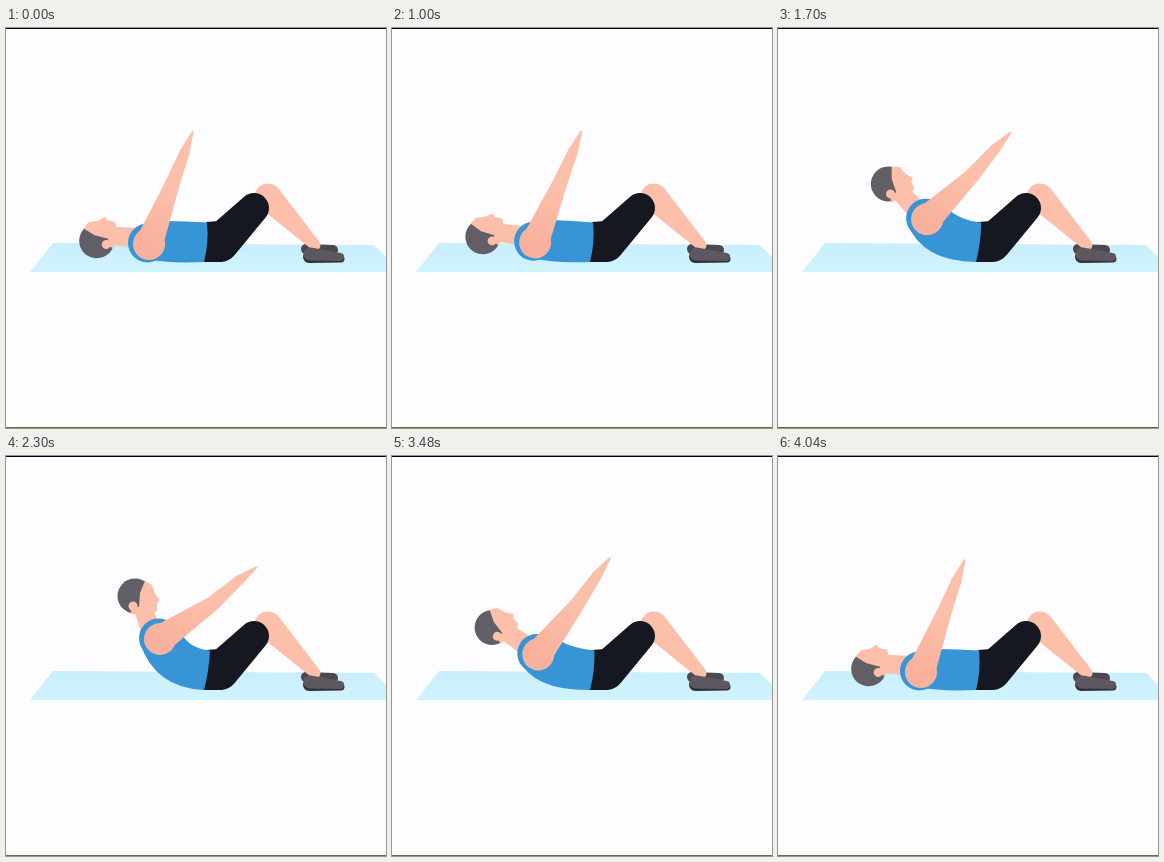
An HTML page with a canvas for the animation above (4140 ms loop, 380x400 px).

```html
<!DOCTYPE html>
<html lang="en">
<head>
<meta charset="utf-8">
<title>Sit-up</title>
<style>
html, body { margin: 0; width: 100%; height: 100%; overflow: hidden; background: #fdfdff; }
canvas { display: block; }
</style>
</head>
<body>
<canvas id="stage" width="380" height="400"></canvas>
<script>
const ctx = document.getElementById('stage').getContext('2d');
const LOOP = 4140;
const SKIN = '#fcbfa9', SHADE = '#f8b19d', HAIR = '#625e66';
const SHIRT = '#3795d5', SHORTS = '#151821';
const mix = (a, b, p) => a + (b - a) * p;

function polygon(color, ...pts) {
  ctx.beginPath();
  pts.forEach(p => ctx.lineTo(...p));
  ctx.fillStyle = color;
  ctx.fill();
}

function circle(color, x, y, r) {
  ctx.beginPath();
  ctx.arc(x, y, r, 0, 2 * Math.PI);
  ctx.fillStyle = color;
  ctx.fill();
}

// Tapered limb: two circles joined by their outer tangents.
function limb(color, x0, y0, r0, x1, y1, r1) {
  const dir = Math.atan2(y1 - y0, x1 - x0);
  const spread = Math.acos((r0 - r1) / Math.hypot(x1 - x0, y1 - y0));
  ctx.beginPath();
  ctx.arc(x0, y0, r0, dir + spread, dir - spread + 2 * Math.PI);
  ctx.arc(x1, y1, r1, dir - spread, dir + spread);
  ctx.fillStyle = color;
  ctx.fill();
}

function local(x, y, angle, paint) {
  ctx.save();
  ctx.translate(x, y);
  ctx.rotate(angle);
  paint();
  ctx.restore();
}

// Fraction of a move that started at the given time, in 40 ms steps with a short rest midway.
function progress(t, start, steps) {
  const d = t - start;
  if (d < 0) return 0;
  const n = 1 + Math.floor(Math.max(Math.min(d, 519), d - 50) / 40);
  return Math.min(1, n / steps);
}

function drawMat() {
  const tint = ctx.createLinearGradient(0, 215, 0, 244);
  tint.addColorStop(0, '#c9eefc');
  tint.addColorStop(1, '#d0f4fe');
  polygon(tint, [47, 215], [368, 217], [380, 229], [380, 244], [24, 244]);
}

function drawLegs() {
  limb('#4c4850', 300, 221, 5, 327, 222, 5);
  limb(SKIN, 262, 169, 13.5, 309, 217, 5.5);
  limb('#34303a', 303, 229, 6, 335, 231, 3.5);
  limb('#5d5860', 304, 226, 6.5, 334, 229, 4);
  limb(SHORTS, 214, 215, 19, 248, 180, 15);
  polygon(SHORTS, [200, 194], [213, 193], [225, 215], [214, 234], [196, 234]);
}

function drawHead() {
  circle(HAIR, -2, -1, 17.5);
  polygon(SKIN, [8, -16], [15, -12], [18, -3], [23, 3], [20, 6], [20, 14],
    [12, 17], [-7, 17], [-4, 9], [2, 10], [3, -4]);
  circle(SKIN, -4, 9, 4.5);
}

function drawArm(p) {
  const sag = 3 * p;
  const tint = ctx.createLinearGradient(0, 0, 60, 0);
  tint.addColorStop(0, SHADE);
  tint.addColorStop(1, SKIN);
  circle(tint, 0, 0, 16);
  limb(tint, 0, 0, 14, 62, sag, 7.5);
  limb(SKIN, 62, sag, 7.5, 98, 0, 5);
  limb(SKIN, 98, 0, 5, 120, 0, 1);
}

function drawShirt(sx, sy, p) {
  circle(SHIRT, sx - 1.5, sy - 1, 19.5);
  ctx.beginPath();
  ctx.moveTo(sx - 20, sy + 4);
  ctx.quadraticCurveTo(mix(133, 149, p), mix(237, 232, p), 198, 234);
  ctx.quadraticCurveTo(203, 215, mix(201, 204, p), 194.5);
  ctx.quadraticCurveTo(mix(180, 184, p), 193, sx + mix(17, 21, p), sy - mix(23, 6, p));
  ctx.lineTo(sx, sy);
  ctx.fill();
}

// p runs from lying flat (0) to sitting up (1).
function drawBody(p) {
  const sx = 143 + 3 * p + 8 * p * p, sy = 216 - 40 * p + 7 * p * p;
  const hx = 92 + 5 * p + 34 * p * p, hy = 211 - 96 * p + 26 * p * p;
  const tilt = -1.4 * (1 - p), c = Math.cos(tilt), s = Math.sin(tilt);

  limb(SKIN, hx + 5 * c - 9 * s, hy + 5 * s + 9 * c, 9, sx - 8, sy - 6, 10);
  drawShirt(sx, sy, p);
  local(hx, hy, tilt, drawHead);
  local(sx, sy, mix(-1.2, -0.64, p), () => drawArm(p));
}

function draw(t) {
  ctx.fillStyle = '#fdfdff';
  ctx.fillRect(0, 0, 380, 400);
  drawMat();
  drawLegs();
  drawBody(progress(t, 1000, 24) - progress(t, 3000, 25));
  ctx.fillStyle = '#000';
  ctx.fillRect(0, 0, 380, 1);
  ctx.fillStyle = '#6b6b48';
  ctx.fillRect(0, 399, 380, 1);
}

const start = performance.now();
function frame() {
  draw((performance.now() - start) % LOOP);
  requestAnimationFrame(frame);
}
frame();
</script>
</body>
</html>
```
